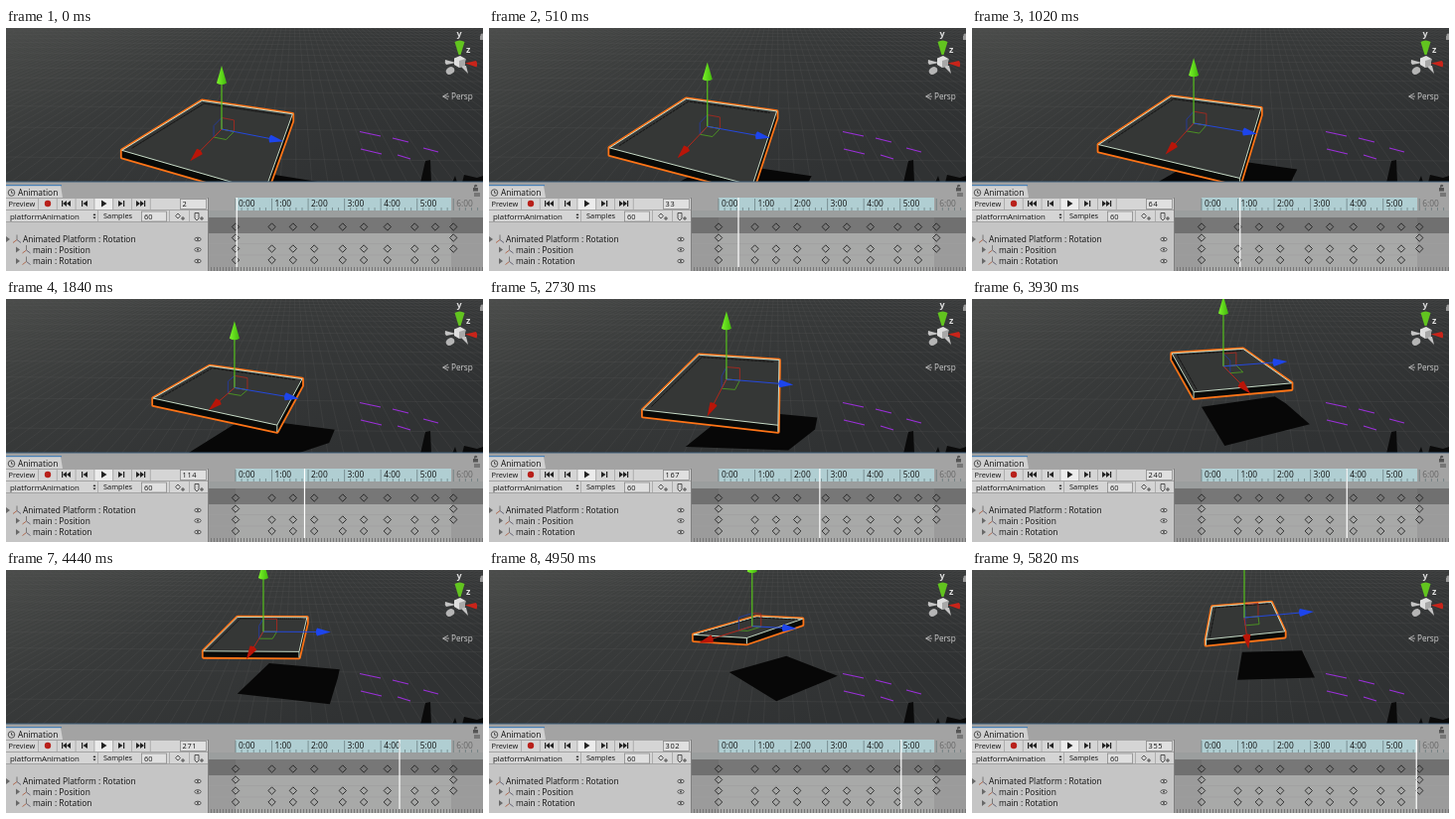
An HTML page that plays this animation: 480x245 px, repeating every 5870 ms.

```html
<!DOCTYPE html>
<html lang="en">
<head>
<meta charset="utf-8">
<title>Platform animation</title>
<style>
html, body { margin: 0; width: 100%; height: 100%; overflow: hidden; background: #343434; }
svg { display: block; width: 480px; height: 245px; }
text { font-family: "Open Sans", "Noto Sans", sans-serif; font-size: 8.4px; fill: #111; }
.mini { font-size: 7.4px; }
.axis { font-size: 9px; font-weight: 700; fill: #ddd; }
.line { fill: none; stroke: #333; stroke-width: .8; }
</style>
</head>
<body>
<svg viewBox="0 0 480 245">
  <defs>
    <linearGradient id="floor" x2=".9" y2=".7">
      <stop offset="0" stop-color="#484a48"/><stop offset=".45" stop-color="#383a3a"/><stop offset="1" stop-color="#303233"/>
    </linearGradient>
    <linearGradient id="leaf"><stop stop-color="#7cf52a"/><stop offset="1" stop-color="#42b80c"/></linearGradient>
    <g id="axes" fill="none">
      <path d="M0 0V-5" stroke="#777"/><path d="M0 0L-4 3" stroke="#b06a50"/><path d="M0 0L4 3" stroke="#667"/>
    </g>
    <g id="eye"><ellipse rx="3.2" ry="1.8" fill="#ddd" stroke="#444" stroke-width=".9"/><circle r=".9" fill="#333"/></g>
  </defs>

  <rect width="480" height="156" fill="url(#floor)"/>
  <path id="grid" fill="none" stroke="#5a5a5a" stroke-width=".5" opacity=".5"/>
  <path id="shadow" fill="#070707"/>
  <path fill="#0a0a0a" d="M417 156L422 134L427 133L428 156ZM449 156L452 149L454 156ZM459 156L461 148L474 151L480 149V156Z"/>
  <path fill="none" stroke="#9a2fd8" stroke-width="1.2" d="M356 104.500L377 109M389 111L405 115M420 121L435 125M357 122L378 127M394 128L407 132"/>

  <path id="hull" fill="#080a08" stroke="#ff7417" stroke-width="3.600" stroke-linejoin="round"/>
  <path id="body" fill="#080a08"/>
  <path id="top" fill="#353736" stroke="#d9efd9" stroke-width=".9" stroke-linejoin="round"/>
  <path id="inner" fill="none" stroke="#151515" stroke-width=".7" stroke-dasharray="3 1"/>
  <path id="edge" stroke="#d9efd9" stroke-width=".9"/>
  <g fill="none">
    <path id="planeR" stroke="#a52a20" stroke-width=".9"/>
    <path id="planeG" stroke="#4d9a22" stroke-width=".9"/>
    <path id="planeB" stroke="#263c9e" stroke-width=".9"/>
    <path id="shaftR" stroke="#b3271a"/><path id="shaftB" stroke="#2448dd"/><path id="shaftG" stroke="#55c01c" stroke-width="1.200"/>
    <path id="coneR" fill="#b91508"/><path id="coneB" fill="#1d45ec"/><path id="coneG" fill="url(#leaf)"/>
  </g>

  <path d="M442 32Q441 35 443 37L453 35ZM463 38L465 46L457 38Z" fill="#c4c4c4"/>
  <ellipse cx="447" cy="43" rx="4.500" ry="3.500" fill="#b5b5b5" transform="rotate(-35 447 43)"/>
  <path d="M462 35.500L473 33Q475 36 473.500 39.500Z" fill="#c9241a"/>
  <path d="M451 30.500L457 28L462.500 31L461.500 38L456 40L451 37Z" fill="#dedede"/>
  <path d="M456 33L462.500 31L461.500 38L456 40Z" fill="#a8a8a8"/>
  <path d="M451.500 14Q456.500 11 461.500 14L457.500 27H455.500Z" fill="#62c41f"/>
  <text class="axis" x="453.500" y="9">y</text>
  <text class="axis" x="463" y="25">z</text>
  <path d="M445 66L439.500 69L445 72M440 69H446" fill="none" stroke="#bbb" stroke-width=".9"/>
  <text x="448" y="72" style="font-size:8.200px;fill:#d0d0d0">Persp</text>
  <path d="M477.500 8V7a1.500 1.500 0 0 1 3 0V8M477 8h4v4h-4z" fill="#999"/>

  <rect y="155" width="480" height="90" fill="#a3a3a3"/>
  <rect y="154.500" width="480" height="1" fill="#41617c"/>
  <path d="M0 171V159H55L57 171Z" fill="#d0d0d0"/>
  <rect y="158" width="56" height="1.200" fill="#477fb5"/>
  <circle cx="5.500" cy="166" r="3.300" class="line"/><path d="M5.500 164V166.300H7.300" class="line"/>
  <text x="12" y="169">Animation</text>
  <path d="M471 161V159.500a1.700 1.700 0 0 1 3.400 0M470 161H475V164.500H470Z" fill="#555"/>
  <path d="M471 167H477M471 169H477" class="line"/>

  <rect y="171" width="203" height="74" fill="#c5c5c5"/>
  <rect y="171" width="203" height="24.500" fill="#d5d5d5"/>
  <path d="M0 171.500H203M0 183.500H203M0 195.500H203" class="line" style="stroke:#999"/>
  <rect x="89" y="172" width="18" height="11" fill="#ececec"/>
  <path id="dividers" stroke="#a2a2a2" stroke-width=".8"/>
  <text class="mini" x="2.500" y="180">Preview</text>
  <circle cx="42" cy="177" r="3.200" fill="#b8201a"/>
  <g fill="#222">
    <path d="M56 174H57.200V180H56ZM61 174V180L57.200 177ZM65 174V180L61 177ZM76 174H77.200V180H76ZM82 174V180L77.500 177ZM96 173.500V180.500L101.500 177ZM113 174V180L117.500 177ZM118 174H119.200V180H118ZM131 174V180L135 177ZM135 174V180L139 177ZM139 174H140.200V180H139Z"/>
    <path d="M87.500 189L89 187L90.500 189ZM87.500 190.500H90.500L89 192.500Z"/>
    <path d="M0 210V216L4 213ZM10 220.500V226.500L14 223.500ZM10 232V238L14 235Z" fill="#686868"/>
  </g>
  <g fill="#e0e0e0" stroke="#8a8a8a" stroke-width=".8">
    <rect x="175.500" y="172.500" width="26" height="10"/><rect x="136.500" y="185" width="25" height="10"/>
  </g>
  <text id="count" class="mini" x="177.500" y="180.200" style="letter-spacing:.7px"></text>
  <text x="4" y="192.500" style="font-size:7.900px">platformAnimation</text>
  <text class="mini" x="98" y="192.300">Samples</text>
  <text class="mini" x="139" y="192.500">60</text>
  <path d="M173 187L175.500 189.500L173 192L170.500 189.500ZM178 190V194M176 192H180M190 186.500H194V192L192 194L190 192ZM197 190V194M195 192H199" class="line"/>
  <text x="17" y="216">Animated Platform : Rotation</text>
  <text x="27" y="226.500">main : Position</text>
  <text x="27" y="238">main : Rotation</text>
  <use href="#axes" x="11" y="213.500"/><use href="#axes" x="20.500" y="224"/><use href="#axes" x="20.500" y="235.500"/>
  <use href="#eye" x="193" y="213"/><use href="#eye" x="193" y="223.500"/><use href="#eye" x="193" y="235"/>

  <rect x="231" y="171" width="217" height="13" fill="#b0ced2"/>
  <rect x="203" y="184" width="277" height="7" fill="#9b9e9e"/>
  <rect x="203" y="191" width="277" height="16" fill="#707070"/>
  <rect x="231" y="191" width="217" height="16" fill="#777"/>
  <rect x="203" y="207" width="277" height="38" fill="#9b9b9b"/>
  <rect x="231" y="207" width="217" height="38" fill="#a8a9a8"/>
  <path d="M203 217.500H480M203 229H480" stroke="#9e9e9e" stroke-width=".7"/>
  <path d="M203 243H480" stroke="#777" stroke-width="4" stroke-dasharray="1 2"/>
  <path d="M203.500 171V245" stroke="#808080"/>
  <path id="ticks" stroke="#64777a" stroke-width=".7"/>
  <g id="labels"></g>
  <path id="keys" fill="none" stroke="#222" stroke-width=".9"/>
  <rect id="head" y="171" width="1.200" height="70" fill="#fff"/>
</svg>
<script>
const LOOP = 5870, STEPS = 127, FIRST = 2, LAST = 355;
const $ = id => document.getElementById(id);
const draw = (id, d) => $(id).setAttribute('d', d);
const frameX = frame => 231 + frame * 0.609;

const add = (a, b) => [a[0] + b[0], a[1] + b[1]];
const scale = (a, k) => [a[0] * k, a[1] * k];
const mix = (a, b, k) => add(scale(a, 1 - k), scale(b, k));
const poly = points => 'M' + points.map(p => p[0].toFixed(2) + ' ' + p[1].toFixed(2)).join('L') + 'Z';

// Rotation keys: frame, yaw in degrees, roll, pitch.
const turns = [
  [2, 27, -.03, .06],
  [64, 24, -.03, .04],
  [113, 22, -.01, -.09],
  [167, 16, -.045, .1],
  [239, -23, .107, -.02],
  [302, 50, -.31, -.05],
  [355, -3.5, -.06, 0]
];

function turnAt(frame) {
  const i = Math.max(0, turns.findLastIndex((key, n) => key[0] <= frame && n < turns.length - 1));
  const a = turns[i], b = turns[i + 1], u = (frame - a[0]) / (b[0] - a[0]);
  return a.map((v, k) => v + (b[k] - v) * u * u * (3 - 2 * u)).slice(1);
}

// Screen vectors of the platform's blue and red half sides.
function sides(size, [yaw, roll, pitch], flat) {
  const c = Math.cos(yaw * Math.PI / 180), s = Math.sin(yaw * Math.PI / 180);
  return [[size * c, size * (flat * s + roll)], [-size * s, size * (flat * c + pitch)]];
}

// Left, back, right and front corner; lower points are nearer and so larger.
function corners(centre, [u, v]) {
  return [[-1, 1], [-1, -1], [1, -1], [1, 1]].map(([a, b]) => {
    const p = add(scale(u, a), scale(v, b));
    return add(centre, scale(p, 1 / (1 - .0095 * p[1])));
  });
}

function convexHull(points) {
  const sorted = [...points].sort((a, b) => a[0] - b[0] || a[1] - b[1]);
  const half = list => list.reduce((out, p) => {
    for (;;) {
      const [a, b] = out.slice(-2);
      if (!b || (b[0] - a[0]) * (p[1] - a[1]) > (b[1] - a[1]) * (p[0] - a[0])) break;
      out.pop();
    }
    return [...out, p];
  }, []).slice(0, -1);
  return [...half(sorted), ...half(sorted.reverse())];
}

function drawSlab(centre, vectors, depth) {
  const top = corners(centre, vectors);
  const drop = p => add(p, [0, depth]);
  const outline = poly(convexHull([...top, ...top.map(drop)]));
  draw('hull', outline);
  draw('body', outline);
  draw('top', poly(top));
  const inset = top.map(p => mix(p, centre, .1));
  draw('inner', poly([inset[0], inset[1], inset[2], inset[1]]));
  const front = top.reduce((a, b) => a[1] > b[1] ? a : b);
  draw('edge', `M${front}L${drop(front)}`);
}

// The near corner of the shadow falls off the ledge until the slab is high.
function drawShadow(p, size, yaw) {
  const centre = mix([246, 166], [304, 94], p);
  const [l, b, r, f] = corners(centre, sides(size, [yaw, 0, 0], .4));
  draw('shadow', poly([l, b, r, mix(r, f, .25), mix(f, centre, Math.max(0, 1 - p / .8))]));
}

function drawArrow(axis, centre, arm, size) {
  const len = Math.hypot(...arm), dir = scale(arm, 1 / len);
  const r = size * .42, side = [-dir[1] * r, dir[0] * r];
  const tip = add(centre, arm), base = add(tip, scale(dir, -Math.min(len, size * 1.45)));
  draw('shaft' + axis, `M${centre}L${base}`);
  draw('cone' + axis, `M${tip}L${add(base, side)}Q${add(base, scale(dir, -r * .6))} ${add(base, scale(side, -1))}Z`);
}

// Handles keep their length on screen while the platform recedes.
function drawGizmo(centre, [u, v], size, p) {
  const blue = scale(u, 70 / size), red = scale(v, 70 / size), green = [0, -64 - 10 * p];
  const plane = (axis, a, b) => {
    const q = add(centre, a), r = add(centre, b);
    draw('plane' + axis, poly([centre, q, add(q, b), r]));
  };
  const [r, g, b] = [scale(red, .25), scale(green, .18), scale(blue, .2)];
  plane('R', g, b);
  plane('G', r, b);
  plane('B', r, g);
  drawArrow('R', centre, red, 9.5);
  drawArrow('B', centre, blue, 9.5);
  drawArrow('G', centre, green, 12);
}

function buildStatic() {
  let grid = '';
  for (let x = -1100; x < 1500; x += 16) grid += `M290 -60L${x} 156`;
  for (let i = 4; i < 26; i++) grid += `M0 ${900 / i - 50}L480 ${900 / i - 46}`;
  draw('grid', grid);

  let dividers = '';
  for (let x = 32.5; x < 150; x += 18.8) dividers += `M${x} 172V183`;
  for (const x of [92.5, 164.5, 184.5]) dividers += `M${x} 184V195`;
  draw('dividers', dividers);

  let ticks = '';
  for (let f = 0; f <= 400; f += 10) {
    const x = frameX(f), whole = f % 60 === 0;
    ticks += `M${x} 184V${whole ? 172 : 181}`;
    if (!whole) continue;
    const label = document.createElementNS('http://www.w3.org/2000/svg', 'text');
    label.setAttribute('x', x + 3);
    label.setAttribute('y', 180);
    if (f === 360) label.style.fill = '#666';
    label.textContent = f / 60 + ':00';
    $('labels').append(label);
  }
  draw('ticks', ticks);

  const all = [0, 60, 95, 130, 177, 212, 251, 296, 330, 360];
  const rows = [[200.5, all], [211.5, [0, 360]], [222.5, all], [234, all.slice(0, -1)]];
  const diamond = (x, y) => `M${x} ${y - 3.7}l3.7 3.700l-3.700 3.700l-3.700 -3.700Z`;
  draw('keys', rows.flatMap(([y, frames]) => frames.map(f => diamond(frameX(f), y))).join(''));
}

function render(now) {
  const step = Math.min(STEPS - 1, Math.floor((now % LOOP + 12) * STEPS / LOOP));
  const p = step / (STEPS - 1), frame = FIRST + (LAST - FIRST) * p;
  $('count').textContent = Math.round(frame);
  $('head').setAttribute('x', frameX(frame) - .6);

  // Early on the platform lags a little behind its straight path.
  const lag = Math.sin(Math.PI * p) * (1 - p);
  const centre = add(mix([217, 102], [274, 48], p), [-9 * lag, 8 * lag]);
  const size = 62 - 28 * p + 7 * lag;
  const turn = turnAt(frame), vectors = sides(size, turn, .45);
  drawShadow(p, size, turn[0]);
  drawSlab(centre, vectors, 4 + size * .05);
  drawGizmo(centre, vectors, size, p);
}

buildStatic();
const start = performance.now();
function tick() {
  render(performance.now() - start);
  requestAnimationFrame(tick);
}
tick();
</script>
</body>
</html>
```
